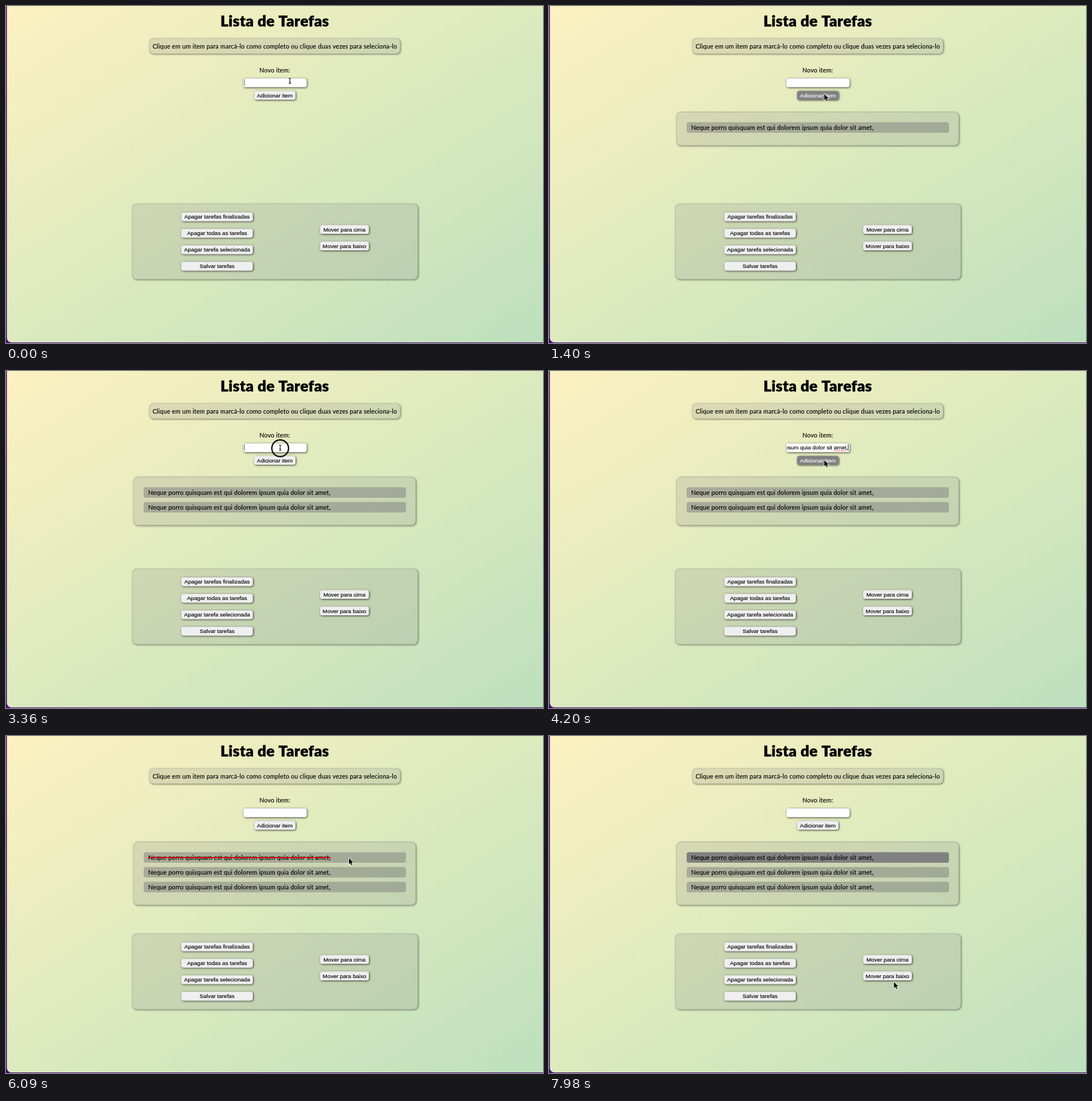
Write an HTML page with a canvas that moves like this. It is 944x593 px and loops after 8 s.

```html
<!DOCTYPE html>
<html lang="pt">
<head>
<meta charset="utf-8">
<title>Lista de Tarefas</title>
<style>
html, body { margin: 0; height: 100%; overflow: hidden; background: #4b0082; }
canvas { display: block; }
</style>
</head>
<body>
<canvas width="944" height="593"></canvas>
<script>
const ctx = document.querySelector('canvas').getContext('2d');
const LOOP = 8000, STEP = 70;
const ITEM = 'Neque porro quisquam est qui dolorem ipsum quia dolor sit amet,';
const BODY = { font: '10.8px Lato, sans-serif', spacing: '.18px', weight: .15 };
const TITLE = { font: '900 26.5px Lato, sans-serif', spacing: '.4px', weight: .5 };
const FORM = { font: '9.95px "Liberation Sans", Arial, sans-serif', spacing: '0px', weight: .15 };

const buttons = [
  ['Adicionar item', 436, 149.5, 73],
  ['Apagar tarefas finalizadas', 308, 363, 126],
  ['Apagar todas as tarefas', 308, 392, 126],
  ['Apagar tarefa selecionada', 308, 421, 126],
  ['Salvar tarefas', 308, 450, 126],
  ['Mover para cima', 552, 385.5, 86],
  ['Mover para baixo', 552, 414.5, 86]
];

// Pointer path: time, x, y
const path = [
  [0, 499, 132], [700, 499, 132], [1050, 484, 155], [1400, 484, 155],
  [1610, 482, 135], [2170, 482, 135], [2660, 483, 151], [2940, 483, 151],
  [3150, 482, 135], [3780, 482, 135], [4200, 484, 157], [4690, 484, 157],
  [5180, 597, 226], [5390, 600, 229], [5600, 600, 229], [5740, 603, 215],
  [6370, 603, 215], [6440, 602, 213], [7420, 602, 213], [7980, 606.5, 433], [8000, 606.5, 433]
];
const clicks = [1330, 1750, 2870, 3360, 4340, 5950, 6580, 6860, 7000];
const added = [1400, 2940, 4410];
const filled = [[420, 1400], [2030, 2940], [3850, 4410]];
const focused = [[0, 1330], [1750, 2870], [3360, 4340]];
const struck = [[6020, 6650], [6930, 7070]];
const caretStarts = [-220, 420, 1750, 2030, 3360, 3850];
const SELECTED_AT = 7070;

const within = (t, spans) => spans.some(([a, b]) => t >= a && t < b);
const inside = (p, x, y, w, h) => p.x >= x && p.x <= x + w && p.y >= y && p.y <= y + h;

function pointerAt(t) {
  const i = path.findIndex(k => k[0] > t);
  const [t0, x0, y0] = path[i - 1], [t1, x1, y1] = path[i];
  const u = (t - t0) / (t1 - t0), e = u * u * (3 - 2 * u);
  return { x: x0 + (x1 - x0) * e, y: y0 + (y1 - y0) * e };
}

function text(str, x, y, style, align = 'center', color = '#000') {
  ctx.font = style.font;
  ctx.letterSpacing = style.spacing;
  ctx.textAlign = align;
  ctx.fillStyle = ctx.strokeStyle = color;
  ctx.lineWidth = style.weight;
  ctx.fillText(str, x, y);
  ctx.strokeText(str, x, y);
}

function fillBox(x, y, w, h, r, fill) {
  ctx.beginPath();
  ctx.roundRect(x, y, w, h, r);
  ctx.fillStyle = fill;
  ctx.fill();
}

// Box with a drop shadow that stays outside a translucent fill
function raisedBox(x, y, w, h, r, fill, border, shadow) {
  ctx.save();
  ctx.beginPath();
  ctx.rect(0, 0, 944, 593);
  ctx.roundRect(x, y, w, h, r);
  ctx.clip('evenodd');
  ctx.shadowColor = shadow;
  ctx.shadowBlur = 3.5;
  ctx.shadowOffsetX = ctx.shadowOffsetY = 1;
  fillBox(x, y, w, h, r, '#888');
  ctx.restore();
  fillBox(x, y, w, h, r, fill);
  ctx.beginPath();
  ctx.roundRect(x + .5, y + .5, w - 1, h - 1, r);
  ctx.strokeStyle = border;
  ctx.lineWidth = 1;
  ctx.stroke();
}

const panel = (x, y, w, h, r) =>
  raisedBox(x, y, w, h, r, 'rgba(128,128,128,.2)', 'rgba(128,128,128,.2)', 'rgba(0,0,0,.5)');

function line(x0, y0, x1, y1, color, width) {
  ctx.beginPath();
  ctx.moveTo(x0, y0);
  ctx.lineTo(x1, y1);
  ctx.strokeStyle = color;
  ctx.lineWidth = width;
  ctx.stroke();
}

function drawPage() {
  ctx.fillStyle = '#4b0082';
  ctx.fillRect(0, 0, 944, 593);
  // Axis perpendicular to the other diagonal
  const k = 944 * 593 / (944 ** 2 + 593 ** 2);
  const dx = 593 * k, dy = 944 * k;
  const g = ctx.createLinearGradient(472 - dx, 296 - dy, 472 + dx, 296 + dy);
  g.addColorStop(0, '#fdf1c0');
  g.addColorStop(.5, '#dceabe');
  g.addColorStop(1, '#bde0bd');
  fillBox(1.5, -20, 943, 612, [0, 0, 2, 8], g);
  text('Lista de Tarefas', 472.5, 35.5, TITLE);
  panel(252, 57, 441, 27, 7);
  text('Clique em um item para marcá-lo como completo ou clique duas vezes para seleciona-lo',
    472.5, 75, BODY);
  text('Novo item:', 472.5, 117, BODY);
  panel(222, 348, 502, 133, 8);
}

function drawInput(t) {
  raisedBox(417, 127, 111.5, 16, 4, '#fff', '#e0e0e0', 'rgba(0,0,0,.7)');
  const hasText = within(t, filled), hasFocus = within(t, focused);
  ctx.save();
  ctx.beginPath();
  ctx.rect(418.5, 128, 108.5, 14);
  ctx.clip();
  if (hasText) {
    text(ITEM, hasFocus ? 525.5 : 418.5, 138, FORM, hasFocus ? 'right' : 'left');
    if (hasFocus) {
      ctx.setLineDash([1.5, 1]);
      line(525.5 - ctx.measureText('amet,').width, 140.2, 523, 140.2, '#e33', 1.2);
      ctx.setLineDash([]);
    }
  }
  const age = t - caretStarts.findLast(s => s <= t);
  if (hasFocus && age % 1000 < 500) {
    const x = hasText ? 526 : 419;
    line(x, 129, x, 140, '#000', .9);
  }
  ctx.restore();
}

function drawList(t) {
  const count = added.filter(a => t >= a).length;
  if (!count) return;
  panel(224, 186.5, 496.5, 33 + 26 * count, 8);
  for (let i = 0; i < count; i++) {
    const y = 204.5 + 26 * i;
    fillBox(242, y, 461, 18.5, 3.5, !i && t >= SELECTED_AT ? '#808080' : 'rgba(128,128,128,.5)');
    text(ITEM, 250, y + 13.3, BODY, 'left');
    if (!i && within(t, struck))
      line(250, 214, 250 + ctx.measureText(ITEM).width, 214, '#d80000', 2);
  }
}

function drawButtons(p) {
  for (const [label, x, y, w] of buttons) {
    const hover = inside(p, x, y - 1, w, 17);
    raisedBox(x, y, w, 15.5, 4, hover ? '#808080' : '#efefef',
      hover ? '#8c8c8c' : '#e2e2e2', 'rgba(0,0,0,.75)');
    text(label, x + w / 2, y + 11, FORM, 'center', hover ? '#fff' : '#000');
  }
}

function drawPointer(t, { x, y }) {
  if (clicks.some(c => t >= c && t < c + STEP)) {
    ctx.beginPath();
    ctx.arc(x, y + 1, 14.7, 0, 7);
    ctx.strokeStyle = '#111';
    ctx.lineWidth = 2.4;
    ctx.stroke();
  }
  ctx.save();
  ctx.translate(x, y);
  if (inside({ x, y }, 417, 127, 111, 16)) {
    line(0, -4, 0, 4, '#000', 1);
    for (const s of [-1, 1]) {
      line(0, 4 * s, -2, 5 * s, '#000', 1);
      line(0, 4 * s, 2, 5 * s, '#000', 1);
    }
    line(-1.5, 1.8, 1.5, 1.8, '#000', .8);
  } else {
    const arrow = new Path2D('M0 0V10.6L2.4 8.4 4.1 12.3 5.8 11.6 4.1 7.8H7.6Z');
    ctx.strokeStyle = '#fff';
    ctx.lineWidth = 1.4;
    ctx.stroke(arrow);
    ctx.fillStyle = '#000';
    ctx.fill(arrow);
  }
  ctx.restore();
}

function draw() {
  const t = Math.floor(performance.now() % LOOP / STEP) * STEP;
  const p = pointerAt(t);
  drawPage();
  drawInput(t);
  drawList(t);
  drawButtons(p);
  drawPointer(t, p);
  requestAnimationFrame(draw);
}
draw();
</script>
</body>
</html>
```
